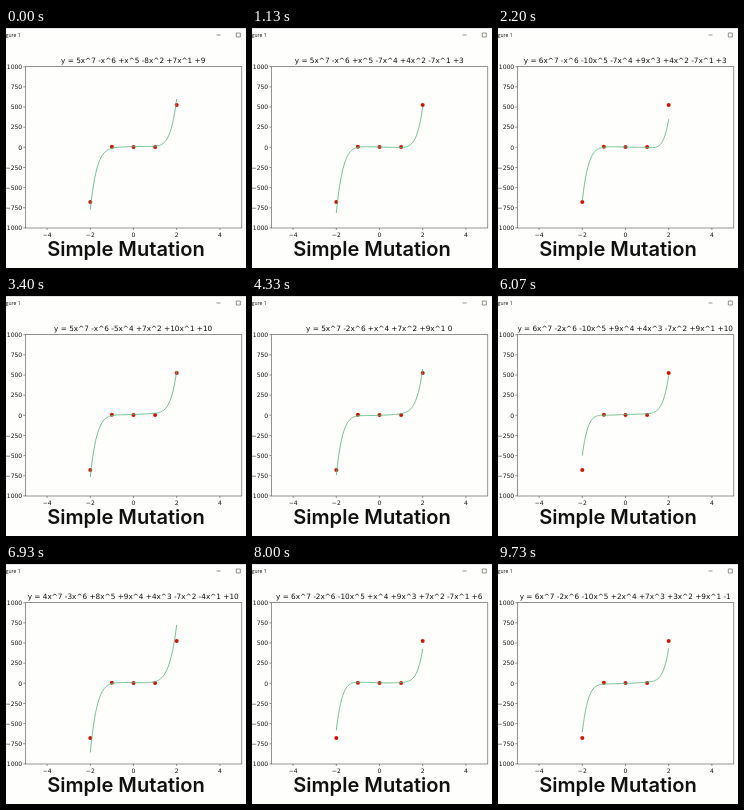
An HTML page that plays this animation: 240x240 px, repeating every 9.79 s.

```html
<!DOCTYPE html>
<html>
<head>
<meta charset="utf-8">
<style>
  html, body { margin: 0; width: 100%; height: 100%; overflow: hidden; background: #fefefc; }
  svg { display: block; width: 240px; height: 240px; }
  text { font-family: "DejaVu Sans", sans-serif; fill: #111; }
  .tick { font-size: 6.05px; }
  .window { font: 5px "Open Sans", sans-serif; }
  .axis { fill: none; stroke: #4c4c46; stroke-width: .6; }
  .caption { font: 600 20.1px Inter, sans-serif; }
  #title { font-size: 7.3px; }
  #curve { fill: none; stroke: #5cb884; stroke-width: .85; }
  #dots { fill: #d01404; }
</style>
</head>
<body>
<svg viewBox="0 0 240 240">
  <clipPath id="plot"><rect x="19.3" y="38.7" width="216.5" height="161.3"/></clipPath>
  <path d="M0 .3H240" stroke="#c4c2c6" stroke-width=".6"/>
  <text class="window" x="14.5" y="9" text-anchor="end">Figure 1</text>
  <path class="axis" d="M210.5 7h4M230.3 5h4v4h-4z"/>
  <text id="title" x="127.2" y="35.3" text-anchor="middle"></text>
  <g id="ticks"></g>
  <rect class="axis" x="19.3" y="38.7" width="216.5" height="161.3"/>
  <g id="dots"></g>
  <path id="curve" clip-path="url(#plot)"/>
  <text class="caption" x="120" y="228.2" text-anchor="middle">Simple Mutation</text>
</svg>
<script>
const $ = id => document.getElementById(id);
const LOOP = 9790, FPS = 15;
const px = x => 127.5 + x * 21.6;
const py = y => 119.3 - y * 0.0806;

const points = [[-2, -680], [-1, 8], [0, 5], [1, 5], [2, 525]];

// Step at which each polynomial is reached; coefficients from x^7 down to x^0
const keys = [
  [0, [5, -1, 1, 0, 0, -8, 7, 9]],
  [33, [6, -1, -10, -7, 9, 4, -7, 3]],
  [51, [5, -1, 0, -5, 0, 7, 10, 10]],
  [78, [6, -2, -10, 1, 3, 1, 9, 0]],
  [104, [4, -3, 8, 9, 4, -7, -4, 10]],
  [120, [6, -2, -10, 1, 9, 7, -7, 6]],
  [146, [6, -2, -10, 2, 7, 3, 9, -1]]
];

const evaluate = (poly, x) => poly.reduce((sum, c) => sum * x + c, 0);
const error = poly => points.reduce((sum, [x, y]) => sum + (evaluate(poly, x) - y) ** 2, 0);

// Change one coefficient at a time, always taking the best-fitting mutation
function mutations(from, to) {
  const chain = [from];
  for (let poly = from; ;) {
    const options = poly.flatMap((c, i) => c === to[i] ? [] : [poly.with(i, to[i])]);
    if (!options.length) return chain;
    poly = options.reduce((a, b) => error(b) < error(a) ? b : a);
    chain.push(poly);
  }
}

const spans = keys.slice(1).map(([end, to], i) => {
  const [start, from] = keys[i];
  return { start, end, chain: mutations(from, to) };
});

function polynomialAt(step) {
  const { start, end, chain } = spans.find(s => step <= s.end) || spans.at(-1);
  const progress = Math.min(1, (step - start) / (end - start));
  return chain[Math.round(progress * (chain.length - 1))];
}

function formula(poly) {
  return "y = " + poly.map((c, i) => {
    const power = 7 - i;
    if (!power) return (c > 0 ? "+" : "") + c;
    if (!c) return "";
    const sign = c < 0 ? "-" : i ? "+" : "";
    return sign + (Math.abs(c) === 1 ? "" : Math.abs(c)) + "x^" + power;
  }).filter(Boolean).join(" ");
}

function curvePath(poly) {
  const path = [];
  for (let i = 0; i <= 80; i++) {
    const x = -2 + i / 20;
    path.push(px(x).toFixed(2) + " " + py(evaluate(poly, x)).toFixed(2));
  }
  return "M" + path.join("L");
}

const label = n => String(n).replace("-", "\u2212");
let ticks = "";
for (let y = -1000; y <= 1000; y += 250)
  ticks += `<path class="axis" d="M17.3 ${py(y)}h2"/>
    <text class="tick" x="16.2" y="${py(y) + 2.3}" text-anchor="end">${label(y)}</text>`;
for (let x = -4; x <= 4; x += 2)
  ticks += `<path class="axis" d="M${px(x)} 200v2"/>
    <text class="tick" x="${px(x)}" y="208.8" text-anchor="middle">${label(x)}</text>`;
$("ticks").innerHTML = ticks;
$("dots").innerHTML = points.map(([x, y]) =>
  `<circle cx="${px(x)}" cy="${py(y)}" r="2"/>`).join("");

function draw() {
  const time = performance.now() % LOOP;
  const poly = polynomialAt(Math.floor((time + 4) * FPS / 1000));
  $("title").textContent = formula(poly);
  $("curve").setAttribute("d", curvePath(poly));
  requestAnimationFrame(draw);
}
draw();
</script>
</body>
</html>
```
